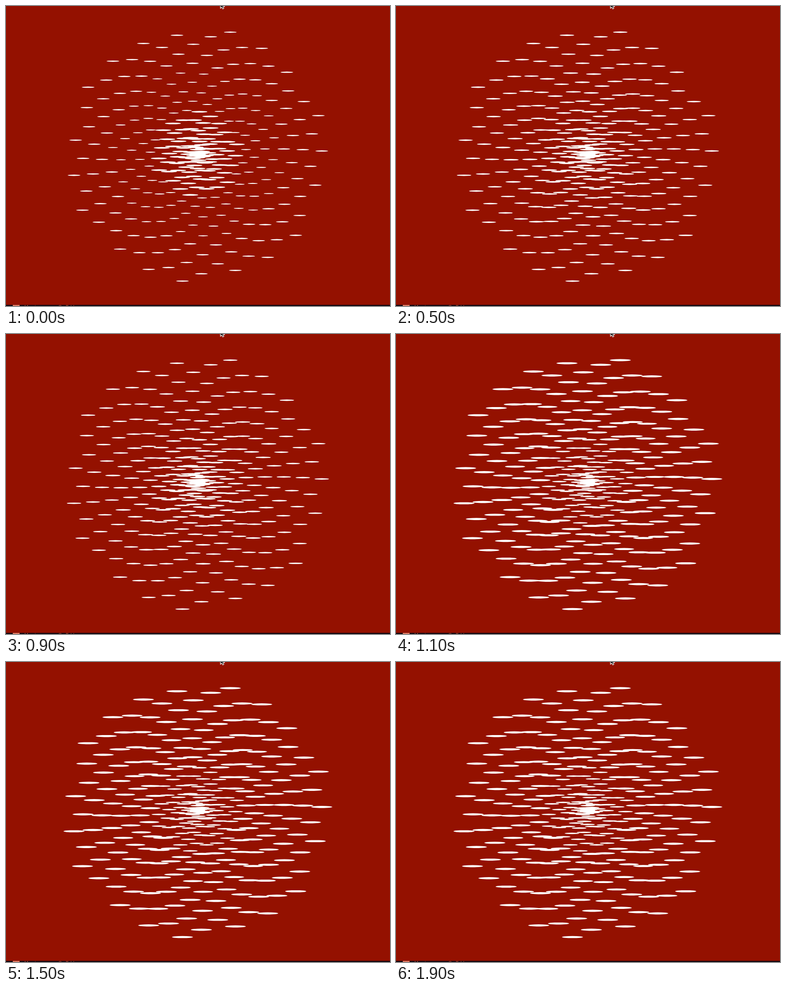
Animation of 847x661 px, one loop 2000 ms. Source, as an HTML page with a canvas:

```html
<!DOCTYPE html>
<html lang="en">
<head>
<meta charset="utf-8">
<title>Pulsing spiral</title>
<style>
  html, body { margin: 0; width: 100%; height: 100%; overflow: hidden; background: #941100; }
  canvas { display: block; }
</style>
</head>
<body>
<canvas id="stage" width="847" height="661"></canvas>
<script>
const ctx = document.getElementById('stage').getContext('2d');
const LOOP = 2000, STEP = 100, BEAT_STEPS = 4;
const CENTER = { x: 422.8, y: 326.7 };
const DOTS = 300, PER_BAND = 100, SPACING = 0.9473;

const smoother = p => p * p * p * (p * (6 * p - 15) + 10);

// Dot width of the inner, middle and outer band as a beat runs from 0 to 1
const bands = [
  p => 35.5 - 3 * p,
  p => 22 + 22.5 * p ** 0.6,
  p => 28 + 18.5 * smoother(p)
];

function drawDots(beat) {
  const widths = bands.map(band => band(beat));
  ctx.fillStyle = '#fff';
  for (let i = 0; i < DOTS; i++) {
    // Each dot turns one radian further along the spiral
    const r = i * SPACING;
    const w = widths[Math.floor(i / PER_BAND)];
    ctx.beginPath();
    ctx.ellipse(CENTER.x + r * Math.cos(i), CENTER.y + r * Math.sin(i), w / 2, w / 20, 0, 0, 2 * Math.PI);
    ctx.fill();
  }
}

function drawPointer() {
  const outline = [[473, -9], [473, 5], [476, 2.5], [478, 6.5], [480.5, 5.5], [478.5, 1.5], [482, 1.5]];
  ctx.beginPath();
  outline.forEach(([x, y]) => ctx.lineTo(x, y));
  ctx.closePath();
  ctx.fillStyle = '#000';
  ctx.fill();
  ctx.strokeStyle = '#fff';
  ctx.lineWidth = 1.2;
  ctx.stroke();
}

function drawStrip() {
  ctx.fillStyle = '#0d0812';
  ctx.fillRect(0, 658.6, 847, 3);
  ctx.fillStyle = '#e8836c';
  ctx.fillRect(15, 658.6, 15, 2.4);
  ctx.fillStyle = '#a8513f';
  ctx.font = 'italic 10px "Liberation Sans", sans-serif';
  ctx.fillText('Mornings', 40, 666.5);
  ctx.fillText('On Table', 115, 666.5);
}

function frame(time) {
  const step = Math.floor((time % LOOP) / STEP);
  ctx.fillStyle = '#941100';
  ctx.fillRect(0, 0, 847, 661);
  drawDots((step % BEAT_STEPS) / (BEAT_STEPS - 1));
  drawPointer();
  drawStrip();
}

const start = performance.now();
function tick() {
  frame(performance.now() - start);
  requestAnimationFrame(tick);
}
tick();
</script>
</body>
</html>
```
